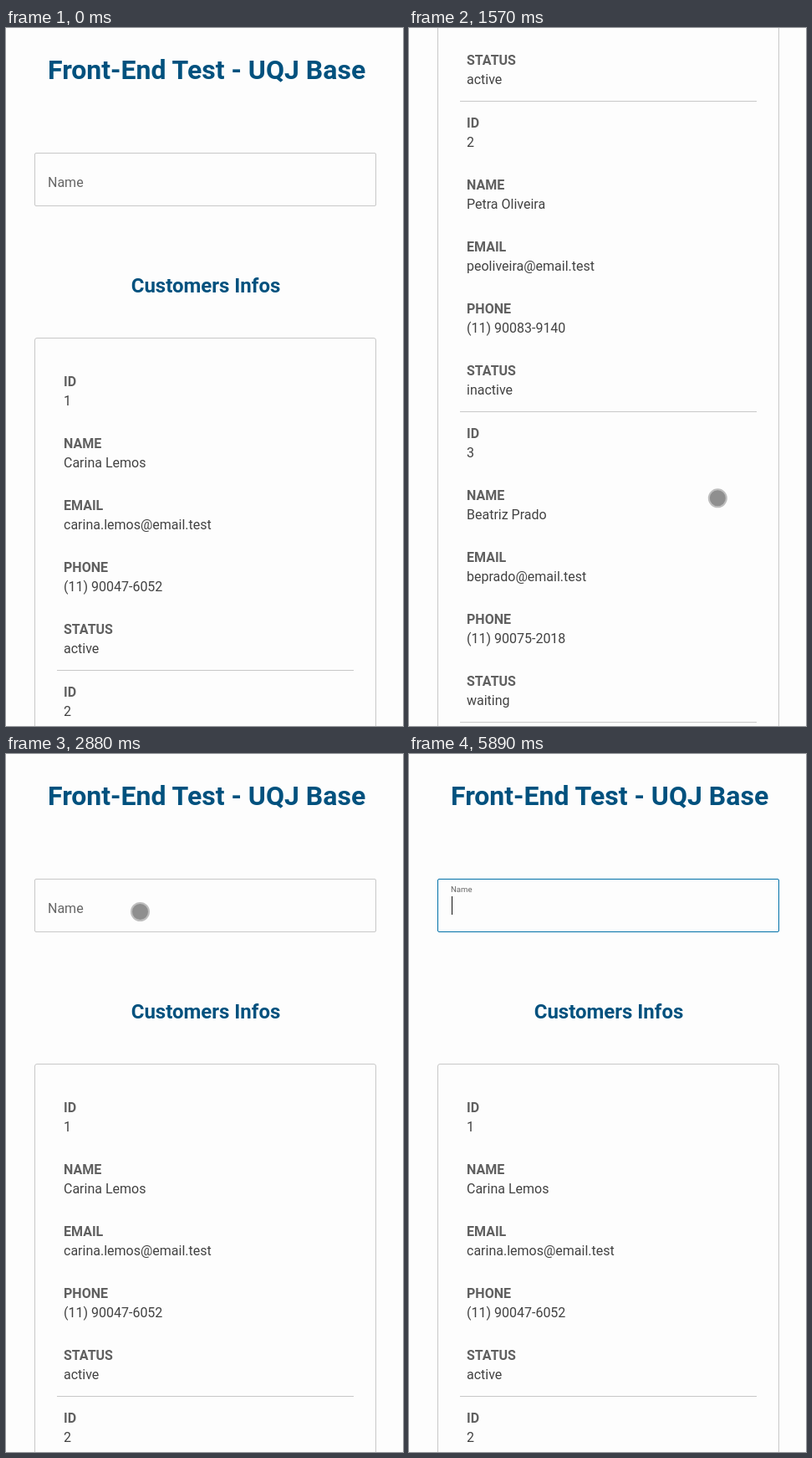
Write an HTML page that moves like this. It is 475 by 834 pixels and loops after 5.96 s.

```html
<!DOCTYPE html>
<html lang="en">
<head>
<meta charset="utf-8">
<title>Front-End Test</title>
<style>
  html, body { margin: 0; width: 100%; height: 100%; overflow: hidden; background: #fdfdfd; }
  svg { display: block; width: 475px; height: 834px; font: 16px Roboto, sans-serif; }
  .title { font-size: 32px; font-weight: 700; fill: #00517e; }
  .sub { font-size: 24px; font-weight: 700; fill: #00517e; }
  .key { font-weight: 700; fill: #606060; }
  .val { fill: #424242; }
  .typed { font-size: 20px; fill: #222; }
  .line { fill: none; stroke: #c8c8c8; }
  .focus { stroke: #0070a8; }
  .active { stroke: #0e7c3a; }
  .inactive { stroke: #78281c; }
</style>
</head>
<body>
<svg viewBox="0 0 475 834">
  <g id="page">
    <text class="title" x="50" y="61">Front-End Test - UQJ Base</text>
    <rect id="field" class="line" x="34.5" y="149.5" width="408" height="63" rx="1.5"/>
    <text id="hint" x="50" fill="#666">Name</text>
    <text id="typed" class="typed" x="50" y="188"></text>
    <rect id="caret" x="51" y="170" width="1" height="22" fill="#111"/>
    <text class="sub" x="239" y="316" text-anchor="middle">Customers Infos</text>
    <rect id="card" class="line" x="34.5" y="370.5" width="408" rx="2.5"/>
    <g id="list"></g>
  </g>
  <circle id="dot" r="10.5" fill="#8f8f8f" stroke="#bebebe" stroke-width="2"/>
</svg>
<script>
const LOOP = 5960, ROW = 371, KEY_GAP = 130, FOCUS = 2950;
const labels = ['ID', 'NAME', 'EMAIL', 'PHONE', 'STATUS'];
const people = [
  ['Carina Lemos', 'carina.lemos@email.test', '(11) 90047-6052', 'active'],
  ['Petra Oliveira', 'peoliveira@email.test', '(11) 90083-9140', 'inactive'],
  ['Beatriz Prado', 'beprado@email.test', '(11) 90075-2018', 'waiting'],
  ['Caetano Mota', 'caetanomota@email.test', '(11) 90038-4471', 'disabled']
];
const words = [
  { text: 'ca', from: 3360, to: 4110 },
  { text: 'pe', from: 4250, to: 5080 }
];
const touch = [
  { t: 70, x: 145, y: 206 },
  { t: 350, x: 390, y: 464 },
  { t: 610, x: 431, y: 720 },
  { t: 1270, x: 375.5, y: 575.5 },
  { t: 1950, x: 361.5, y: 544.5 },
  { t: 2490, x: 388, y: 462 },
  { t: 2880, x: 160.5, y: 188.5 }
];

const el = id => document.getElementById(id);
const [page, field, hint, typed, caret, card, list, dot] =
  ['page', 'field', 'hint', 'typed', 'caret', 'card', 'list', 'dot'].map(el);

const set = (node, attrs) => {
  for (const k in attrs) node.setAttribute(k, attrs[k]);
};
const show = (node, on) => set(node, { visibility: on ? 'visible' : 'hidden' });

// progress of t from a to b, clamped to 0..1
const ramp = (t, a, b) => Math.min(1, Math.max(0, (t - a) / (b - a)));
const lerp = (a, b, f) => a + (b - a) * f;

function pointer(t) {
  const pos = { ...touch[0] };
  touch.slice(1).forEach((b, i) => {
    const a = touch[i], f = ramp(t, a.t, b.t);
    pos.x += (b.x - a.x) * f;
    pos.y += (b.y - a.y) * f;
  });
  const leave = ramp(t, 5480, 5820);
  return { cx: lerp(pos.x, 370, leave), cy: lerp(pos.y, 816, leave) };
}

// two swipes down the page, then one back to the top
const scrollAt = t =>
  (405 * ramp(t, 610, 1270) + 707 * ramp(t, 1270, 2044)) * (1 - ramp(t, 2130, 2490));

// letters arrive one by one and are deleted the same way
function textAt(t) {
  const word = words.find(w => t >= w.from && t < w.to);
  if (!word) return '';
  const count = Math.min(Math.floor((t - word.from) / KEY_GAP) + 1,
    Math.ceil((word.to - t) / KEY_GAP));
  return word.text.slice(0, count);
}

const matches = text => people.filter(p => p[0].toLowerCase().startsWith(text));

function entry(person, i) {
  const top = i * ROW;
  const cells = [i + 1, ...person].map((value, n) => {
    const y = top + 428 + n * 74;
    return `<text class="key" x="69" y="${y}">${labels[n]}</text>` +
      `<text class="val" x="69" y="${y + 23}">${value}</text>`;
  });
  return cells.join('') + `<path class="line" d="M61 ${top + 767.5}H416"/>`;
}

let shown = null;
function showList(text) {
  if (text === shown) return;
  shown = text;
  const found = matches(text);
  list.innerHTML = found.map(entry).join('');
  set(card, { height: 416 + (found.length - 1) * ROW });
}

function draw(t) {
  const text = textAt(t), focused = t >= FOCUS;
  const state = text ? matches(text)[0][3] : focused ? 'focus' : '';
  typed.textContent = text;
  set(field, { class: 'line ' + state });
  showList(text || textAt(t - KEY_GAP));

  const lift = ramp(t, FOCUS, FOCUS + 100);
  set(hint, { y: lerp(190, 165, lift) });
  hint.style.fontSize = lerp(16, 9.6, lift) + 'px';
  show(caret, focused && !text && (t < words[0].from || t > 5480));

  set(page, { transform: `translate(0 ${-Math.round(scrollAt(t))})` });
  set(dot, pointer(t));
  show(dot, t >= touch[0].t && t < 5885);
}

function tick() {
  draw(performance.now() % LOOP);
  requestAnimationFrame(tick);
}
tick();
</script>
</body>
</html>
```
